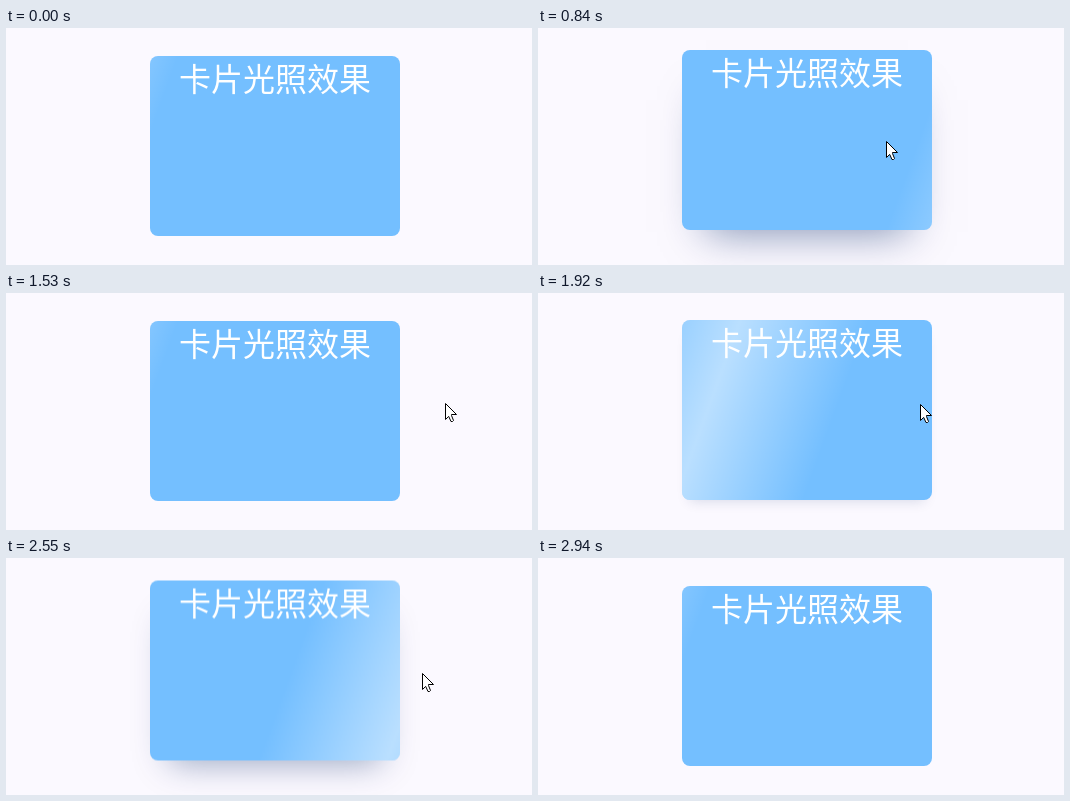
These frames come from a looping animation (526x237 px, 3.69 s). An HTML page:

```html
<!DOCTYPE html>
<html lang="zh-CN">
<head>
<meta charset="utf-8">
<title>卡片光照效果</title>
<style>
  html, body {
    margin: 0;
    width: 100%;
    height: 100%;
    overflow: hidden;
    background: #fbf9ff;
  }
  .stage {
    position: relative;
    width: 526px;
    height: 237px;
    overflow: hidden;
  }
  .card {
    position: absolute;
    left: 144px;
    top: 28px;
    width: 250px;
    height: 180px;
    border-radius: 8px;
    overflow: hidden;
    background: #74bfff;
    color: #fff;
    font: 500 32px/43px "Noto Sans CJK SC", "Noto Sans CJK", sans-serif;
    text-align: center;
    white-space: nowrap;
    will-change: transform;
  }
  .shine {
    position: absolute;
    inset: 0;
  }
  .label {
    position: relative;
  }
  .cursor {
    position: absolute;
    left: 0;
    top: 0;
    overflow: visible;
  }
</style>
</head>
<body>
<div class="stage">
  <div class="card">
    <div class="shine"></div>
    <div class="label">卡片光照效果</div>
  </div>
  <svg class="cursor" width="13" height="20">
    <path d="M.5 .5V16.5L3.7 13.4L6 18.5H7.5L8.5 17.5L6.5 12.5V11.5H11.5Z" fill="#fff" stroke="#000"/>
  </svg>
</div>
<script>
const LOOP = 3690, STEP = 30, FADE = 300, LAG = 20, LIFT = 6;
const card = document.querySelector('.card');
const shine = document.querySelector('.shine');
const cursor = document.querySelector('.cursor');

// Hover intervals: pointer enters, pointer leaves.
const hovers = [[514, 1200], [1857, 2504]];

// Pointer path: time, x, y.
const path = [
  [300, 505, 78], [390, 465, 95], [510, 394, 108], [600, 378, 109], [780, 348, 113],
  [1080, 348, 113], [1200, 394, 111], [1500, 439, 110],
  [1710, 439, 110], [1857, 394, 111], [2010, 365, 112], [2160, 358, 113],
  [2460, 358, 113], [2504, 394, 114], [2550, 416, 115], [2940, 517, 152]
];

const clamp = v => Math.min(1, Math.max(0, v));
const mix = (a, b, k) => a + (b - a) * k;
const bez = (a, b, s) => 3 * a * s * (1 - s) ** 2 + 3 * b * s * s * (1 - s) + s ** 3;

// cubic-bezier(.25, .1, .25, 1)
function ease(x) {
  let lo = 0, hi = 1;
  for (let i = 0; i < 20; i++) {
    const mid = (lo + hi) / 2;
    if (bez(.25, .25, mid) < x) lo = mid; else hi = mid;
  }
  return x <= 0 ? 0 : x >= 1 ? 1 : bez(.1, 1, lo);
}

function hover(t) {
  return hovers.reduce((sum, [enter, leave]) =>
    sum + ease(clamp((t - enter) / FADE)) - ease(clamp((t - leave) / FADE)), 0);
}

function pointer(t) {
  const i = path.findIndex(p => p[0] > t);
  if (i < 1) return null;
  const [a, b] = [path[i - 1], path[i]];
  const k = (t - a[0]) / (b[0] - a[0]);
  return [mix(a[1], b[1], k), mix(a[2], b[2], k)].map(Math.round);
}

function draw(t) {
  const p = hover(t);
  card.style.transform = `translateY(${-LIFT * hover(t - LAG)}px)`;
  card.style.boxShadow =
    `0 ${26 * p}px ${40 * p}px ${-24 * p}px rgba(0,36,100,${.5 * p})`;

  const mid = mix(-94, 374, p), half = 121;
  shine.style.background = `linear-gradient(110deg, rgba(255,255,255,0) ${mid - half}px,` +
    `rgba(255,255,255,.5) ${mid}px, rgba(255,255,255,0) ${mid + half}px)`;

  const pos = pointer(t);
  cursor.style.visibility = pos ? 'visible' : 'hidden';
  if (pos) cursor.style.transform = `translate(${pos[0]}px, ${pos[1]}px)`;
}

const start = performance.now();
function tick() {
  const t = (performance.now() - start) % LOOP;
  draw(Math.floor(t / STEP) * STEP);
  requestAnimationFrame(tick);
}
draw(0);
requestAnimationFrame(tick);
</script>
</body>
</html>
```
